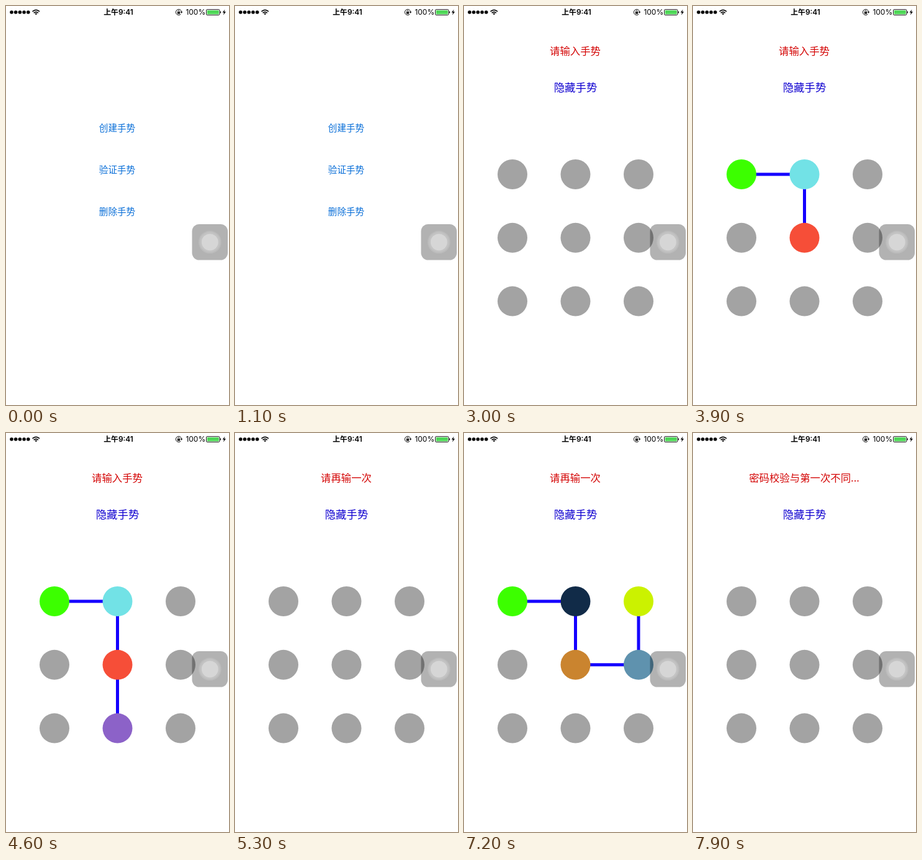
Write an HTML page that moves like this. It is 359x640 px and loops after 8 s.

```html
<!DOCTYPE html>
<html lang="zh-CN">
<head>
<meta charset="utf-8">
<title>手势</title>
<style>
html, body { margin: 0; width: 100%; height: 100%; overflow: hidden; background: #fff; }
svg { display: block; width: 100%; height: 100%; }
text { font-family: "Noto Sans CJK SC", "Noto Sans CJK", sans-serif; text-anchor: middle; }
.menu { font-size: 14.6px; fill: #0a6fd8; }
.msg { font-size: 16.4px; fill: #d40606; }
.hide { font-size: 17.4px; fill: #1000d0; }
.bar text { font-family: Inter, "Noto Sans CJK SC", sans-serif; font-size: 12px; }
</style>
</head>
<body>
<svg viewBox="0 0 359 640" xmlns="http://www.w3.org/2000/svg">
  <rect width="359" height="640" fill="#fff"/>
  <g class="menu">
    <text id="create" x="179" y="200.5">创建手势</text>
    <text x="179" y="267.5">验证手势</text>
    <text x="179" y="334.5">删除手势</text>
  </g>
  <g id="sheet">
    <rect width="359" height="640" fill="#fff"/>
    <text id="msg" class="msg" x="179" y="78.3"></text>
    <text class="hide" x="179.5" y="136.6">隐藏手势</text>
    <polyline id="line" fill="none" stroke="#1400ff" stroke-width="5" stroke-linejoin="round"/>
    <g id="dots"></g>
  </g>
  <g class="bar">
    <g id="signal"></g>
    <g fill="none" stroke="#000" stroke-width="1.7">
      <path d="M42.6 8.9Q48.3 3.9 54 8.9"/>
      <path d="M44.7 11.1Q48.3 8 51.9 11.1"/>
    </g>
    <path d="M46.3 12.2Q48.3 10.6 50.3 12.2L48.3 14.3Z"/>
    <text x="181" y="14.3" style="font-weight:600;font-size:11.9px">上午9:41</text>
    <path d="M281.3 13.2A4.6 4.6 0 1 1 282.6 9.4" fill="none" stroke="#000"/>
    <path d="M280.6 9.2h3.8l-1.9 2.5Z"/>
    <rect x="275.9" y="9.4" width="4.2" height="3.2"/>
    <path d="M276.7 9.6V8.5a1.3 1.3 0 0 1 2.6 0V9.6" fill="none" stroke="#000" stroke-width=".8"/>
    <text x="305.3" y="14.3">100%</text>
    <rect x="322.5" y="5.6" width="21.4" height="8.9" rx="1.6" fill="none" stroke="#000" stroke-width=".9"/>
    <rect x="323.8" y="6.9" width="18.8" height="6.3" rx=".6" fill="#4fd858"/>
    <path d="M344.7 8.3q1.5 .2 1.5 1.7t-1.5 1.7Z"/>
    <path d="M352.3 5.5L348.6 10.6H351L349.9 14.6L354 9.2H351.4Z"/>
  </g>
  <g>
    <rect x="299.5" y="350" width="57.5" height="57.5" rx="11.5" fill="#000" fill-opacity=".3"/>
    <g fill="#fff">
      <circle cx="328.3" cy="378.8" r="18.3" fill-opacity=".13"/>
      <circle cx="328.3" cy="378.8" r="16.2" fill-opacity=".1"/>
      <circle cx="328.3" cy="378.8" r="13.4" fill-opacity=".32"/>
    </g>
  </g>
</svg>
<script>
const LOOP = 8000, STEP = 100, R = 24, GREY = '#a3a3a3';
const $ = id => document.getElementById(id);

function circle(parent, cx, cy, r, fill) {
  const c = document.createElementNS('http://www.w3.org/2000/svg', 'circle');
  for (const [k, v] of Object.entries({ cx, cy, r, fill })) c.setAttribute(k, v);
  return parent.appendChild(c);
}

for (let i = 0; i < 5; i++) circle($('signal'), 9 + i * 6.7, 10, 2.8, '#000');

const spots = Array.from({ length: 9 }, (_, i) => [
  78 + (i % 3) * 101.5,
  270 + Math.floor(i / 3) * 101.8
]);
const dots = spots.map(([x, y]) => circle($('dots'), x, y, R, GREY));

// Each stop: [time the finger reaches the dot, dot index, colour]
const strokes = [
  { clear: 4800, stops: [
    [3400, 0, '#3cff00'], [3650, 1, '#72e2e6'], [3900, 4, '#f64e38'], [4100, 7, '#8c62c8']
  ] },
  { clear: 7600, stops: [
    [6500, 0, '#3cff00'], [6600, 0, '#3cff00'], [6900, 1, '#112b48'],
    [7000, 4, '#ca842f'], [7100, 5, '#5f92ae'], [7200, 2, '#cbf200']
  ] }
];

const messages = [
  [0, '请输入手势'],
  [4800, '请再输一次'],
  [7600, '密码校验与第一次不同...']
];

function fingerAt(stops, t) {
  const n = stops.findIndex(s => s[0] > t);
  if (n < 0) return spots[stops[stops.length - 1][1]];
  const [t0, a] = stops[n - 1], [t1, b] = stops[n];
  const k = (t - t0) / (t1 - t0);
  return spots[a].map((v, i) => v + (spots[b][i] - v) * k);
}

function drawStroke(t) {
  const s = strokes.find(s => t >= s.stops[0][0] && t < s.clear);
  const colours = Array(9).fill(GREY);
  let points = [];
  if (s) {
    const finger = fingerAt(s.stops, t);
    for (const [at, i, colour] of s.stops) {
      const near = Math.hypot(finger[0] - spots[i][0], finger[1] - spots[i][1]) < R;
      if (t < at && !near) break;
      colours[i] = colour;
      points.push(spots[i]);
    }
    points.push(finger);
  }
  dots.forEach((d, i) => d.setAttribute('fill', colours[i]));
  $('line').setAttribute('points', points.join(' '));
}

// Critically damped spring, from one screen height down to 0
function sheetY(t) {
  const u = Math.max(0, t - 2048) * 0.0254;
  return t >= 2600 ? 0 : 640 * (1 + u) * Math.exp(-u);
}

function pressAlpha(t) {
  if (t < 1900) return 1;
  return Math.min(1, 0.2 + Math.max(0, t - 2000) * 0.0016);
}

function render(t) {
  $('create').setAttribute('opacity', pressAlpha(t));
  $('sheet').setAttribute('transform', `translate(0 ${sheetY(t).toFixed(2)})`);
  const text = messages.filter(m => t >= m[0]).pop()[1];
  if ($('msg').textContent !== text) $('msg').textContent = text;
  drawStroke(t);
}

const start = performance.now();
function tick() {
  const t = (performance.now() - start) % LOOP;
  render(Math.floor(t / STEP) * STEP);
  requestAnimationFrame(tick);
}
tick();
</script>
</body>
</html>
```
